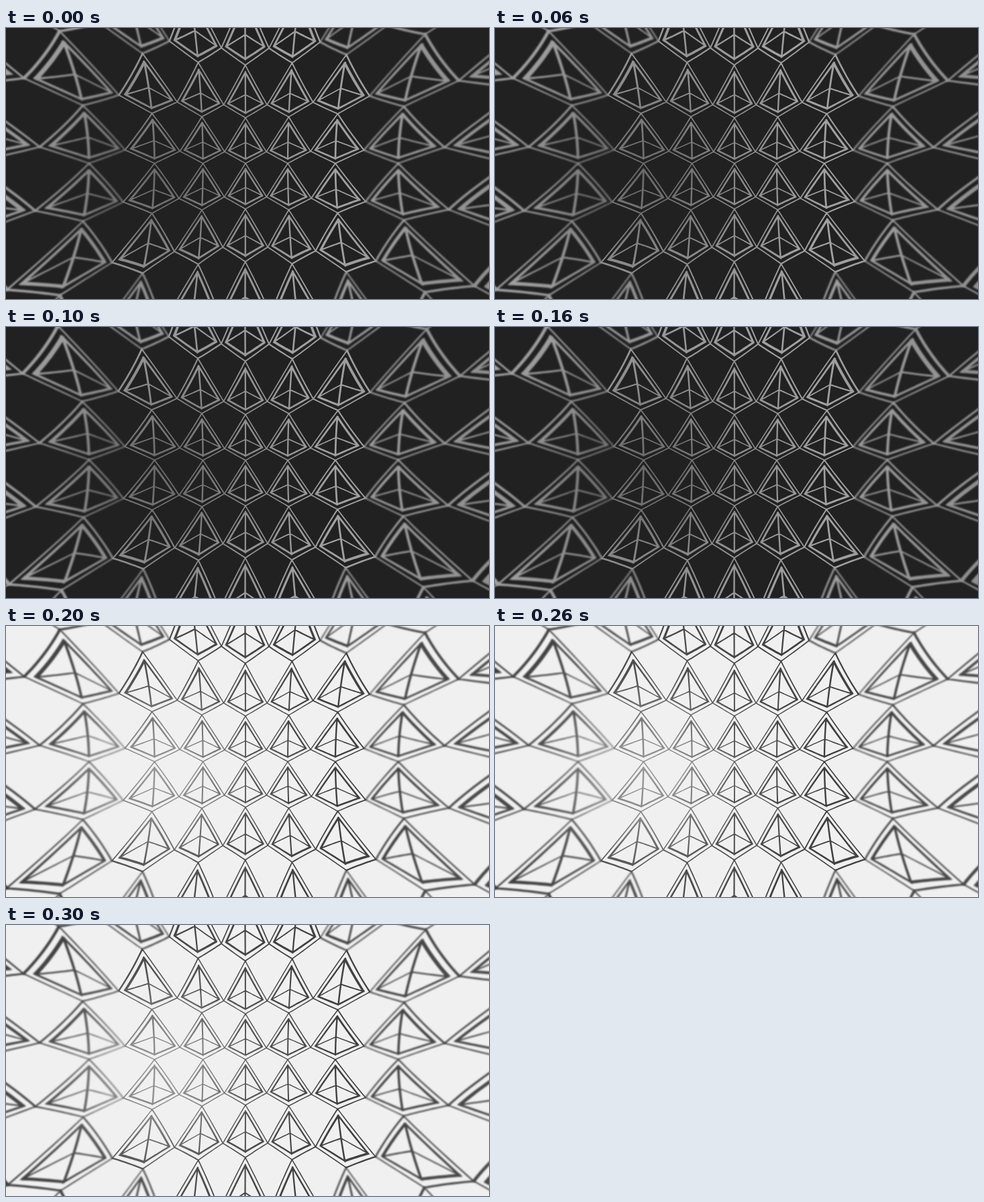
An HTML page with a canvas for the animation above (0.4 s loop, 720 px wide and 405 px high).

```html
<!DOCTYPE html>
<html lang="en">
<head>
<meta charset="utf-8">
<title>Warped pyramid lattice</title>
<style>
  html, body { margin: 0; width: 100%; height: 100%; overflow: hidden; background: #212121; }
  canvas { display: block; width: 100vw; height: 100vh; }
</style>
</head>
<body>
<canvas id="stage" width="720" height="405"></canvas>
<script>
const W = 720, H = 405;
const ctx = document.getElementById('stage').getContext('2d');

// Lattice units: columns are 1 apart, rows ROW apart, origin at the lens centre.
const ROW = 1.075, SHIFT_X = -0.048, SHIFT_Y = -0.003;
const STEP_MS = 100;

const dark = {
  back: '#212121', weight: 1.15,
  stops: [[0, '#686868'], [0.12, '#747474'], [0.3, '#8e8e8e'], [0.55, '#a2a2a2'], [1, '#909090']]
};
const light = {
  back: '#f0f0f0', weight: 1,
  stops: [[0, '#989898'], [0.12, '#888888'], [0.3, '#505050'], [0.55, '#3e3e3e'], [1, '#4a4a4a']]
};
const steps = [
  { look: dark, scroll: 0 },
  { look: dark, scroll: -0.05 },
  { look: light, scroll: 0.006 },
  { look: light, scroll: -0.02 }
];

// One cell: the bottom tip is at 0,0 and the top tip at 0,-ROW.
const kite = (top, side, sideY, bottom) =>
  [[0, top], [side, sideY], [0, bottom], [-side, sideY]];
const outer = kite(-ROW, 0.5, -0.28, 0);
const inner = kite(-ROW + 0.135, 0.4, -0.308, -0.107);
const hub = [0, -0.5];

const edges = [];
const addLoop = (pts, width) =>
  pts.forEach((p, i) => edges.push([p, pts[(i + 1) % pts.length], width]));
addLoop(outer, 0.021);
addLoop(inner, 0.033);
edges.push([inner[0], inner[2], 0.03]);
edges.push([hub, inner[1], 0.021], [hub, inner[3], 0.021]);

// Pincushion lens
function warp(u, w) {
  const v = u * u + w * w;
  const s = 61.9 + 1.3 * v + 0.0044 * v * v * v;
  return [W / 2 + u * s, H / 2 + w * s];
}

// Adds an edge as a thin strip bent by the lens, so its weight stretches too.
function addStrip(a, b, width, ox, oy) {
  const dx = b[0] - a[0], dy = b[1] - a[1];
  const len = Math.hypot(dx, dy);
  const ex = dx / len * width / 2, ey = dy / len * width / 2;
  const n = 10;
  for (let i = 0; i <= 2 * n + 1; i++) {
    const back = i > n;
    const t = (back ? 2 * n + 1 - i : i) / n;
    const side = back ? -1 : 1;
    const cap = 2 * t - 1;
    const p = warp(
      ox + a[0] + dx * t + ex * cap - ey * side,
      oy + a[1] + dy * t + ey * cap + ex * side
    );
    if (i) ctx.lineTo(p[0], p[1]);
    else ctx.moveTo(p[0], p[1]);
  }
  ctx.closePath();
}

function drawCell(ox, oy, weight) {
  const [x, y] = warp(ox, oy - 0.5);
  const dist = Math.hypot(x - W / 2, y - H / 2);
  const blur = 0.3 + Math.max(0, dist - 110) / 240;
  ctx.filter = `blur(${Math.min(blur, 1.3).toFixed(2)}px)`;
  ctx.beginPath();
  for (const [a, b, width] of edges) addStrip(a, b, width * weight, ox, oy);
  ctx.fill();
}

function draw({ look, scroll }) {
  ctx.filter = 'none';
  ctx.fillStyle = look.back;
  ctx.fillRect(0, 0, W, H);
  const ink = ctx.createRadialGradient(222, 222, 0, 222, 222, 500);
  look.stops.forEach(([at, color]) => ink.addColorStop(at, color));
  ctx.fillStyle = ink;
  for (let row = -2; row <= 3; row++) {
    for (let col = -4; col <= 4; col++) {
      drawCell(col + SHIFT_X, row * ROW + SHIFT_Y + scroll, look.weight);
    }
  }
  ctx.filter = 'none';
}

let shown = -1;
const start = performance.now();
function tick() {
  const elapsed = Math.max(0, performance.now() - start);
  const index = Math.floor(elapsed / STEP_MS) % steps.length;
  if (index !== shown) {
    shown = index;
    draw(steps[index]);
  }
  requestAnimationFrame(tick);
}
tick();
</script>
</body>
</html>
```
